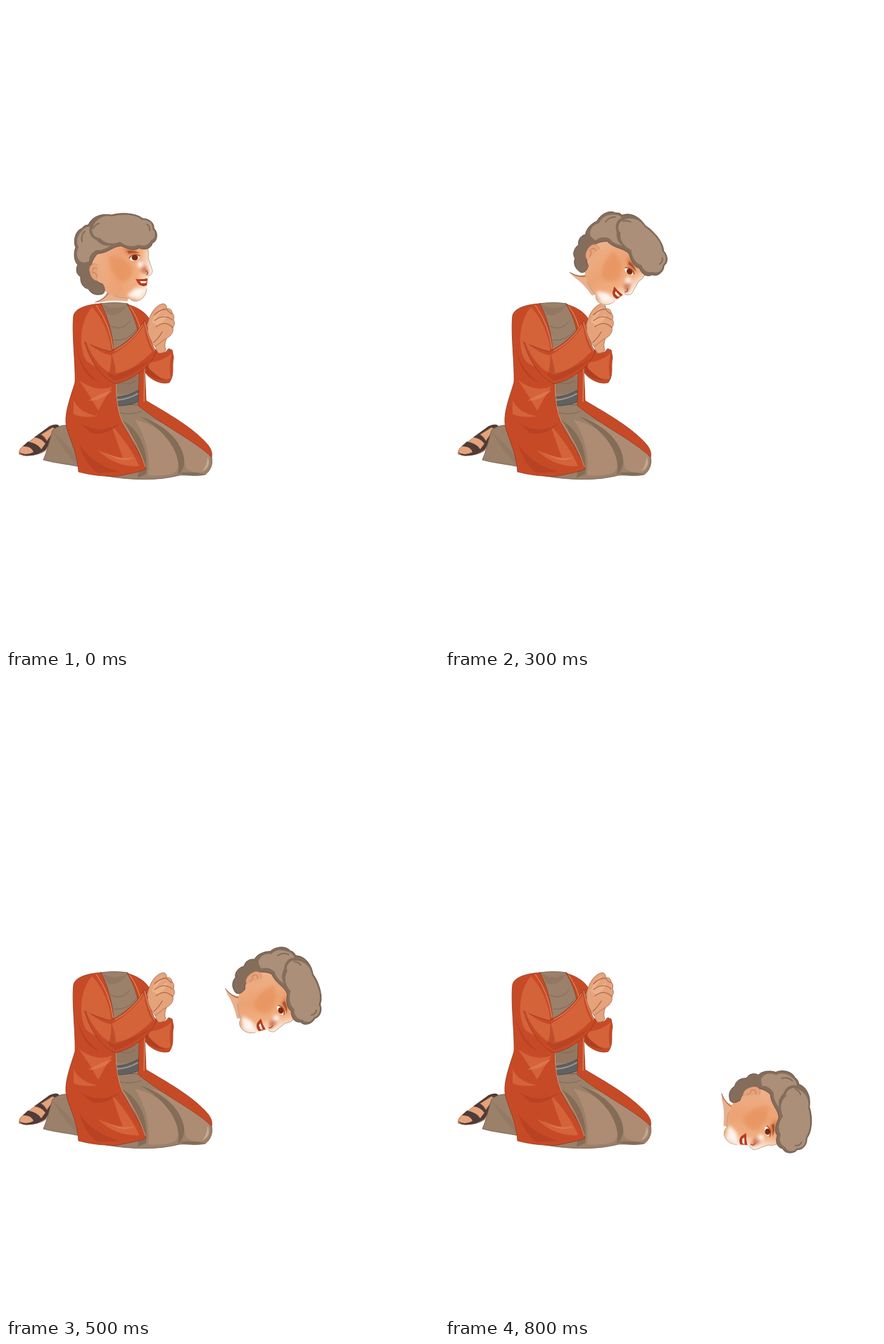
Recreate the animation shown at these times as an HTML page. Size 615 by 911 pixels, loop 0.85 s.

```html
<!DOCTYPE html>
<html lang="en">
<head>
<meta charset="utf-8">
<title>Kneeling figure</title>
<style>
html, body { margin: 0; height: 100%; overflow: hidden; background: #fff; }
svg { display: block; width: 100%; height: 100%; }
path { stroke-linecap: round; stroke-linejoin: round; }
.robe { fill: #c74a27; stroke: #93391d; stroke-width: .8; }
.light { fill: #d4633a; }
.dark { fill: #b03f20; }
.glow { fill: #e07e56; }
.cloth { fill: #9b806a; stroke: #705a49; stroke-width: .8; }
.clothLight { fill: #ad8c73; }
.clothDark { fill: #856c57; }
.skin { fill: #e5a37c; stroke: #a5684a; stroke-width: .8; }
.line { fill: none; stroke: #a8633f; stroke-width: 1.1; }
.crease { fill: none; stroke: #806a56; stroke-width: 1; }
.trim { fill: none; stroke: #e59468; stroke-width: 1; }
.sandal { fill: #4f3b38; }
.hair { fill: #846d5b; stroke: #65524a; stroke-width: .9; }
.curl { fill: #ab8f78; }
.wave { fill: none; stroke: #846d5b; stroke-width: 2; }
</style>
</head>
<body>
<svg viewBox="0 0 615 911">
  <defs>
    <linearGradient id="face" gradientUnits="userSpaceOnUse" x1="122" y1="372" x2="209" y2="384">
      <stop offset="0" stop-color="#efb18a"/>
      <stop offset=".45" stop-color="#eca273"/>
      <stop offset=".75" stop-color="#f0ae80"/>
      <stop offset=".9" stop-color="#fbe0cc"/>
      <stop offset="1" stop-color="#fff"/>
    </linearGradient>
    <filter id="soft" x="-50%" y="-50%" width="200%" height="200%"><feGaussianBlur stdDeviation="2"/></filter>
  </defs>

  <g id="body">
    <!-- feet and back leg -->
    <path class="skin" d="M19 637C17 630 24 625 33 619L62 598L72 600L56 632C48 638 30 641 19 637Z"/>
    <path class="sandal" d="M19 634Q27 640 39 634Q36 625 24 626L31 619Q46 622 50 630L56 622Q50 614 40 613L62 597Q74 592 76 598L56 631Q46 638 34 639Q22 641 19 634Z"/>
    <path class="skin" d="M50 609L66 599L70 601L58 618Q55 612 50 609Z"/>
    <path class="cloth" d="M88 596C80 595 72 598 66 603C62 616 58 634 53 645C70 650 88 651 106 655V600Z"/>
    <path class="clothDark" d="M66 605Q82 618 102 641V653Q82 632 66 605Z" opacity=".3"/>

    <!-- lap -->
    <path class="cloth" d="M156 562L192 565C220 584 258 602 287 630C296 642 294 658 283 666C269 669 257 666 246 667C216 675 178 674 142 668L150 600Z"/>
    <path class="clothLight" d="M183 588C212 594 238 614 245 640C247 653 244 660 238 664C225 668 211 668 202 667C205 640 199 613 183 588Z"/>
    <path class="clothLight" d="M204 587C237 596 271 615 287 635C292 647 290 658 279 663C268 664 260 661 255 656C253 630 233 606 204 587Z"/>
    <path class="clothDark" d="M190 583C224 594 249 617 253 643C254 654 250 662 244 666C250 638 230 606 190 583ZM166 589C190 603 203 632 199 665L187 671C192 638 181 610 166 589ZM246 664Q264 661 282 665Q264 670 246 664Z"/>
    <path fill="#c3aa93" d="M286 641C291 649 287 658 279 661Q286 652 286 641Z"/>

    <!-- tunic -->
    <path class="cloth" d="M134 423Q154 420 173 423L191 460L189 567L156 566L149 480Z"/>
    <path class="clothDark" d="M137 424Q153 434 172 425Q160 444 144 438ZM155 520Q172 530 188 525V550Q166 553 156 550Z" opacity=".4"/>
    <path class="crease" d="M149 455Q165 463 176 448M153 475Q173 477 185 460M160 535Q174 540 184 533M160 578Q180 582 192 576"/>
    <path fill="#63615f" stroke="#444" stroke-width=".8" d="M155 556Q173 555 188 546L189 562Q173 569 156 568Z"/>
    <path fill="none" stroke="#999b99" stroke-width="2" d="M157 560Q174 559 187 551"/>

    <!-- far side of the robe -->
    <path class="robe" d="M172 424C184 427 197 434 203 444L195 470L199 561C226 577 266 599 287 624Q294 633 292 641C268 618 224 597 188 568L189 520L188 466C185 449 180 437 172 424Z"/>
    <path class="trim" d="M176 427Q188 444 191 461M197 505L196 562"/>
    <path class="robe" d="M198 502L212 488Q223 499 231 487L236 489L238 500C235 512 240 524 232 535C222 539 204 531 198 521Z"/>
    <path class="light" d="M203 507Q222 505 235 494Q231 511 234 529Q221 534 203 518Z"/>
    <path class="dark" d="M199 510Q211 525 226 532Q207 531 199 521Z"/>

    <!-- near side of the robe -->
    <path class="robe" d="M135 423C115 424 98 430 96 440C93 462 99 510 98 535C92 555 84 575 85 592C87 611 101 630 103 662C125 668 148 669 160 668C176 664 189 663 199 658C191 635 172 608 164 590C156 570 156 548 155 530L152 480C149 458 143 439 135 423Z"/>
    <path class="light" d="M122 428C135 441 146 464 149 485L151 512Q128 518 114 504C103 487 104 449 122 428Z"/>
    <path class="light" d="M104 532Q128 550 151 541Q140 558 131 575Q118 552 104 532ZM96 560Q104 578 130 583Q108 586 96 580ZM150 596Q178 627 189 654Q156 656 130 631Q149 640 166 642Q158 621 150 596Z"/>
    <path class="glow" d="M151 546Q133 551 117 561Q137 561 151 546ZM137 632Q160 647 183 641Q166 653 137 632Z" opacity=".7"/>
    <path class="dark" d="M104 592Q134 611 163 592Q143 612 121 607ZM104 622Q120 650 161 662L130 664Q112 651 104 622ZM99 480Q105 515 133 535Q106 527 99 480Z" opacity=".6"/>
    <path class="trim" d="M128 425Q148 453 152 487M156 533Q156 571 165 591Q187 621 198 655"/>

    <!-- near arm -->
    <path class="robe" d="M112 478C123 483 138 489 148 491C166 483 186 466 197 447C202 456 204 477 213 491C208 510 181 532 155 537C139 530 121 510 112 478Z"/>
    <path class="light" d="M113 476Q136 496 150 496Q180 479 196 454Q199 478 208 491Q186 514 155 525Q128 515 113 476Z"/>
    <path class="dark" d="M149 492Q151 510 145 525L155 533Q185 524 207 501Q181 517 156 522Q155 507 149 492Z" opacity=".55"/>
    <path class="trim" d="M197 449Q202 475 211 490M155 490Q181 476 194 453"/>

    <!-- hands -->
    <path class="skin" d="M210 478L228 472Q224 482 227 489Q222 495 216 493Z"/>
    <path class="skin" d="M202 449C206 434 214 424 224 423Q229 425 228 430Q235 429 236 436Q240 440 238 446Q241 452 237 457C239 466 231 471 225 474L212 484Q204 475 201 462Z"/>
    <path fill="#ecb28b" d="M207 449Q213 433 223 427Q221 436 213 443Q222 443 229 437Q227 449 215 454Z"/>
    <path class="line" d="M211 439Q220 430 228 431Q234 438 236 437M211 447Q224 437 236 446M213 456Q226 446 237 457M222 463Q217 472 210 478"/>
  </g>

  <g id="head">
    <path fill="#eab08c" d="M127 421Q144 415 147 395L178 409L172 420Q150 417 135 421Z"/>
    <path fill="none" stroke="#6f4a3a" stroke-width=".9" d="M127 421Q142 416 146 407"/>
    <path fill="url(#face)" d="M118 350L165 335L201 342Q204 350 202 357Q205 367 208 376Q208 382 202 383Q204 388 201 392Q203 398 199 402Q200 412 191 418Q181 423 174 415Q154 414 140 405Q118 390 118 350Z"/>
    <path fill="none" stroke="#a9988d" stroke-width=".8" d="M201 345Q204 351 202 358L208 376Q208 382 202 384M200 402Q199 413 190 418Q181 422 175 415Q166 416 153 412"/>
    <g filter="url(#soft)">
      <path fill="#e58c54" opacity=".5" d="M146 355Q168 355 180 372Q182 388 164 392Q146 380 146 355Z"/>
      <path fill="#c65b2b" opacity=".7" d="M166 345Q180 345 189 352L175 354ZM194 366Q202 372 203 381Q194 382 190 374Z"/>
      <path fill="#fff" opacity=".85" d="M189 362L196 366L192 373L186 369ZM184 401L198 402L191 415Q180 417 172 411Z"/>
    </g>
    <path fill="#b0522f" d="M172 348Q181 346 190 351Q180 350 174 352Z"/>
    <path fill="#fff" d="M176 358Q183 351 190 357Q185 364 176 361Z"/>
    <ellipse cx="183" cy="357.500" rx="4.500" ry="4" fill="#792815"/>
    <path fill="none" stroke="#a04a2a" stroke-width="1.300" d="M175 358Q182 350 190 355M199 376Q203 379 200 382"/>
    <path fill="#b53a20" d="M184 388Q193 389 201 387L200 397Q193 400 188 395Z"/>
    <path fill="#fff3e9" d="M190 391L200 391L198 394L192 394Z"/>

    <path class="hair" d="M117 311C121 300 135 294 150 297C163 293 185 294 194 302C204 302 211 309 210 316C216 321 216 334 208 337C206 346 196 347 189 344C182 349 172 345 164 341C152 341 146 351 130 352C124 358 119 368 121 378C124 388 130 393 137 395C142 402 141 410 134 410C124 412 118 405 117 402C109 401 105 392 106 385C99 381 99 372 102 368C96 362 96 350 99 343C95 335 98 319 108 316Q111 311 117 311Z"/>
    <path class="curl" d="M122 319C125 301 142 296 151 299C166 295 185 296 193 304C203 303 209 310 208 317C214 322 212 331 206 333C202 341 194 342 188 339C179 344 168 340 162 335C151 340 139 337 134 330Q124 330 122 319Z"/>
    <path class="curl" d="M109 318Q115 313 119 314Q116 327 129 333Q138 343 149 340Q139 348 128 347Q117 354 118 363Q107 367 103 360Q98 352 103 343Q97 331 109 318Z"/>
    <path class="wave" d="M124 316Q127 310 132 309M200 310Q205 313 204 319M112 320Q106 326 108 335"/>
    <path class="skin" style="stroke:#cf8b64" d="M132 369C124 362 117 369 119 378C121 387 126 392 133 390Z"/>
    <path fill="#ebaa80" d="M130 368L137 364V392L131 391Z"/>
    <path class="line" style="stroke:#cf8056" d="M129 373Q122 370 123 379Q128 378 129 385"/>
  </g>
</svg>
<script>
const LOOP = 850, STEP = 50;
const CENTER = [160, 357];
// time, centre x, centre y, turn in degrees
const KEYS = [
  [0, 160, 357, 0], [100, 174, 341, 15], [200, 199, 348, 30.5],
  [400, 304, 383, 63], [500, 383, 455, 70], [550, 404, 492, 73],
  [600, 416, 511, 76], [700, 445, 584, 82], [800, 458, 626, 88]
];
const head = document.getElementById("head");

function slope(i, c) {
  const a = KEYS[Math.max(i - 1, 0)], b = KEYS[Math.min(i + 1, KEYS.length - 1)];
  return (b[c] - a[c]) / (b[0] - a[0]);
}

// Cubic curve through the keys
function valueAt(t, c) {
  let i = 0;
  while (i < KEYS.length - 2 && t >= KEYS[i + 1][0]) i++;
  const a = KEYS[i], b = KEYS[i + 1], d = b[0] - a[0], u = (t - a[0]) / d, v = 1 - u;
  return v * v * ((1 + 2 * u) * a[c] + u * d * slope(i, c))
       + u * u * ((1 + 2 * v) * b[c] - v * d * slope(i + 1, c));
}

function draw(now) {
  const t = Math.floor(now % LOOP / STEP) * STEP;
  const [x, y, turn] = [1, 2, 3].map(c => valueAt(t, c));
  head.setAttribute("transform",
    `translate(${x} ${y}) rotate(${turn}) translate(${-CENTER[0]} ${-CENTER[1]})`);
  requestAnimationFrame(draw);
}
draw(performance.now());
</script>
</body>
</html>
```
